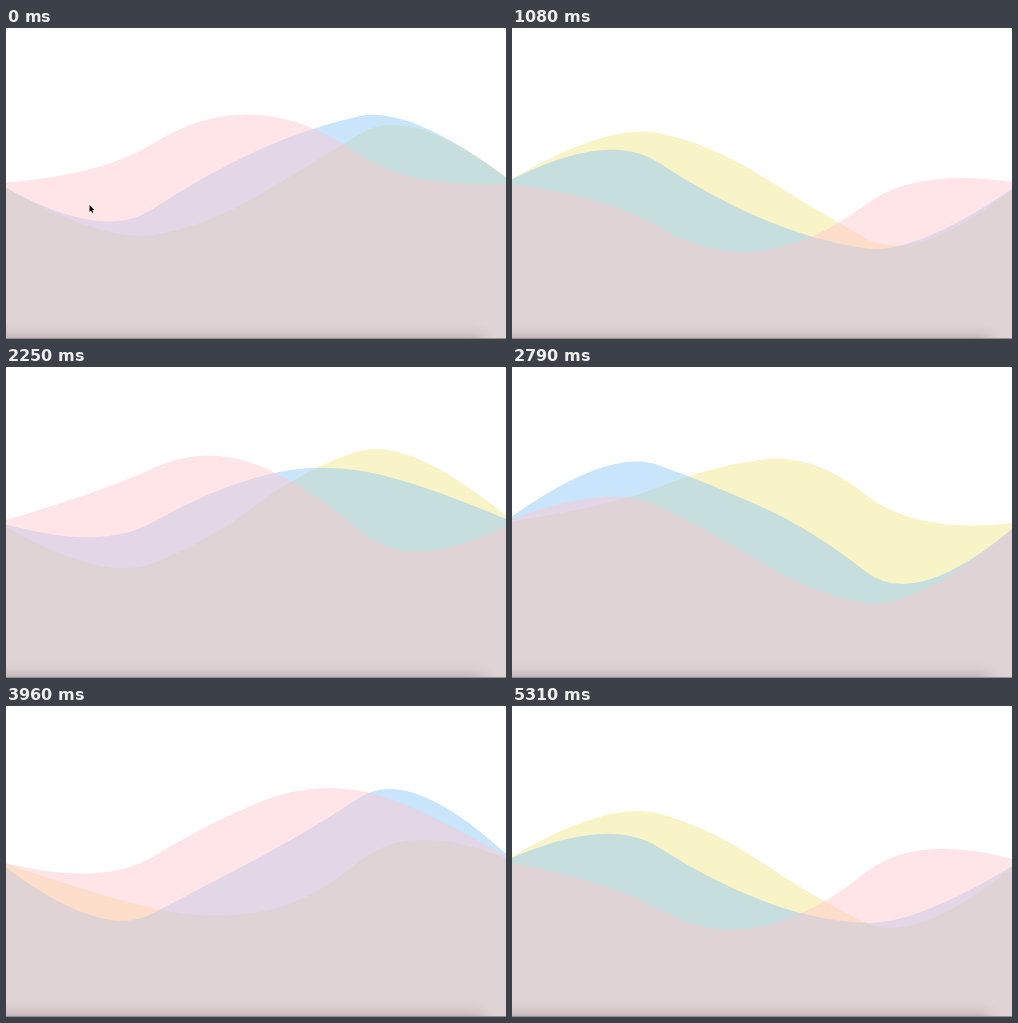
These frames come from a looping animation (500 px wide and 311 px high, 5340 ms). An HTML page with a canvas:

```html
<!DOCTYPE html>
<html lang="en">
<head>
<meta charset="utf-8">
<title>Waves</title>
<style>
  html, body { margin: 0; width: 100%; height: 100%; overflow: hidden; background: #fff; }
  canvas { display: block; width: 500px; height: 311px; }
</style>
</head>
<body>
<canvas id="stage" width="500" height="311"></canvas>
<script>
const W = 500, H = 311;
const LOOP = 5340, TICK = 30;
const BASE = 155.3;           // rest height of every wave
const LEFT = -8, STEP = 103.2; // first anchor and spacing
const SPEED = 0.003;          // radians per ms
const LAG = 1.02;             // phase between neighbouring points

// painted back to front
const waves = [
  { color: "rgba(242,231,131,.45)", phase: 1.894, amps: [62, 59, 91, 87] },
  { color: "rgba(135,197,248,.45)", phase: 0.89, amps: [80, 50, 60, 98] },
  { color: "rgba(255,195,204,.45)", phase: -0.105, amps: [52, 78, 80, 106] }
];

const ctx = document.getElementById("stage").getContext("2d");

function drawWave(wave, t) {
  const pts = wave.amps.map((amp, i) => ({
    x: LEFT + STEP * (i + 1),
    y: BASE - amp * Math.cos(SPEED * t - wave.phase - (1.5 - i) * LAG)
  }));
  const right = LEFT + STEP * 5;

  ctx.beginPath();
  ctx.moveTo(LEFT, BASE);
  pts.forEach((p, i) => {
    const next = pts[i + 1];
    if (next) ctx.quadraticCurveTo(p.x, p.y, (p.x + next.x) / 2, (p.y + next.y) / 2);
    else ctx.quadraticCurveTo(p.x, p.y, right, BASE);
  });
  ctx.lineTo(right, H + 5);
  ctx.lineTo(LEFT, H + 5);
  ctx.closePath();
  ctx.fillStyle = wave.color;
  ctx.fill();
}

function drawEdge() {
  ctx.save();
  ctx.shadowColor = "rgba(0,0,0,.3)";
  ctx.shadowBlur = 15;
  ctx.fillStyle = "#968f8e";
  ctx.fillRect(-60, H, 537, 40);
  ctx.restore();
  ctx.fillStyle = "#968f8e";
  ctx.fillRect(0, H - 1, W, 1);
}

function drawPointer(x, y) {
  const shape = [[0, 0], [0, 7], [1.6, 5.6], [2.7, 8], [3.8, 7.5], [2.8, 5.1], [4.9, 5]];
  ctx.beginPath();
  shape.forEach(([dx, dy]) => ctx.lineTo(x + dx, y + dy));
  ctx.closePath();
  ctx.lineWidth = 1;
  ctx.strokeStyle = "#fff";
  ctx.stroke();
  ctx.fillStyle = "#000";
  ctx.fill();
}

function draw(ms) {
  const now = ms % LOOP;
  let t = Math.floor(now / TICK) * TICK;
  if (t > 210 && t < 420) t = 210; // short hitch
  ctx.fillStyle = "#fff";
  ctx.fillRect(0, 0, W, H);
  waves.forEach(w => drawWave(w, t));
  drawEdge();
  if (now < 420) drawPointer(83.5, 177);
}

const start = performance.now();
function frame() {
  draw(performance.now() - start);
  requestAnimationFrame(frame);
}
frame();
</script>
</body>
</html>
```
